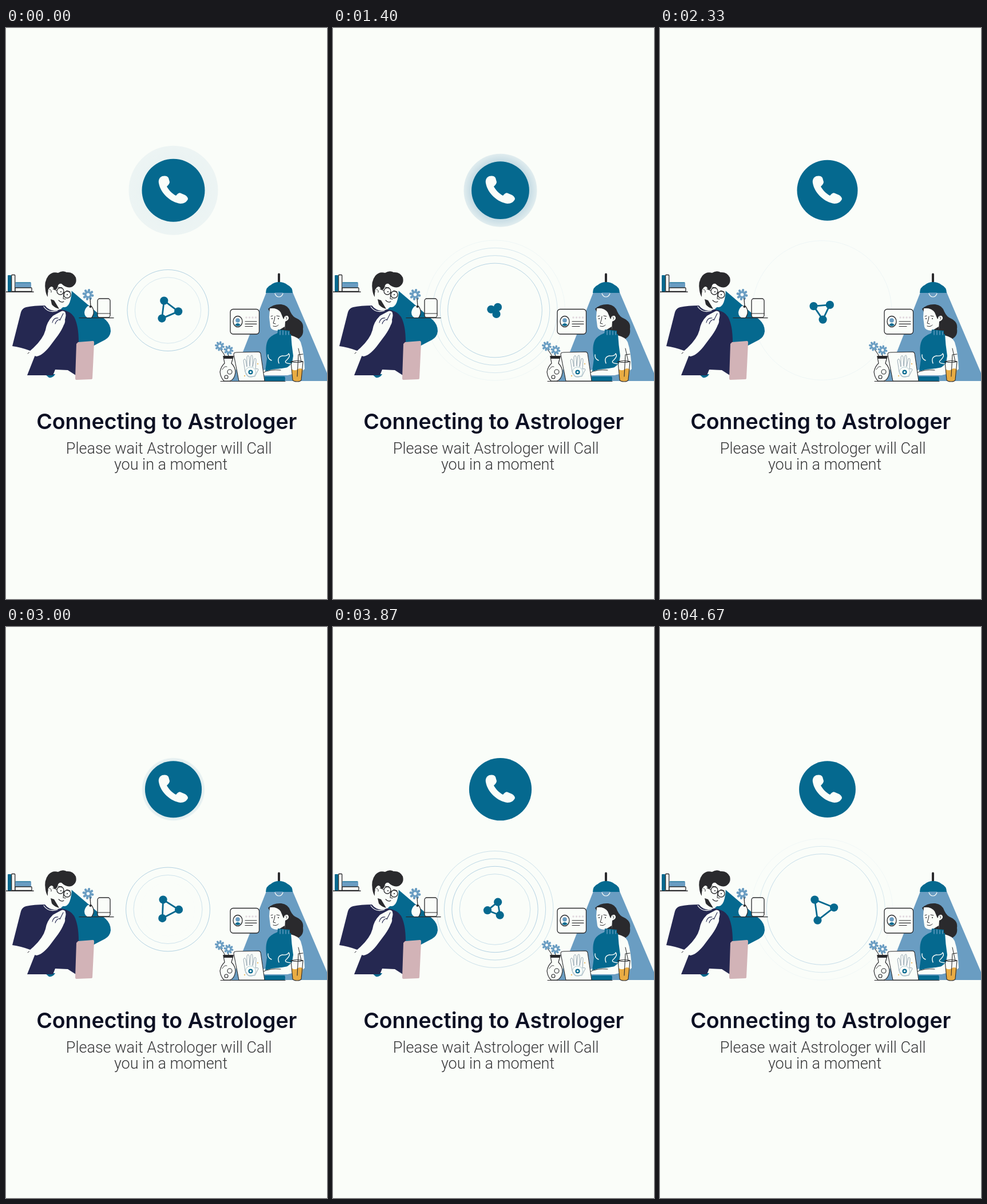
These frames come from a looping animation (561 px wide and 998 px high, 4.74 s). An HTML page with a canvas:

```html
<!DOCTYPE html>
<html lang="en">
<head>
<meta charset="utf-8">
<title>Connecting</title>
<style>
  html, body { margin: 0; width: 100%; height: 100%; overflow: hidden; background: #fafdf9; }
  canvas { display: block; }
</style>
</head>
<body>
<canvas id="stage" width="561" height="998"></canvas>
<script>
const LOOP = 4740;
const TEAL = '#05698f', NAVY = '#252851', INK = '#2a2a2d', SKY = '#6a9dc2', PAPER = '#fafdf9';
const stage = document.getElementById('stage');
let ctx = stage.getContext('2d');

const fill = (color, d) => { ctx.fillStyle = color; ctx.fill(new Path2D(d)); };
const line = (color, width, d) => {
  ctx.strokeStyle = color;
  ctx.lineWidth = width;
  ctx.stroke(new Path2D(d));
};
const shape = (color, d, width = 1.4) => { fill(color, d); line(INK, width, d); };

function disc(x, y, r, color, border) {
  ctx.beginPath();
  ctx.arc(x, y, Math.max(r, 0), 0, Math.PI * 2);
  if (color) { ctx.fillStyle = color; ctx.fill(); }
  if (border) { ctx.strokeStyle = border; ctx.stroke(); }
}

function box(x, y, w, h, r, color, border) {
  ctx.beginPath();
  ctx.roundRect(x, y, w, h, r);
  if (color) { ctx.fillStyle = color; ctx.fill(); }
  if (border) { ctx.strokeStyle = border; ctx.lineWidth = 1.3; ctx.stroke(); }
}

function flower(x, y, r) {
  for (let i = 0; i < 8; i++) {
    const a = i * Math.PI / 4 + 0.2;
    line(SKY, r * 0.42, `M${x} ${y}L${x + Math.cos(a) * r * 0.8} ${y + Math.sin(a) * r * 0.8}`);
  }
  disc(x, y, r * 0.28, PAPER);
}

// Smooth curve through [time, value] pairs
function curve(keys, t) {
  const last = keys.length - 1;
  if (t <= keys[0][0]) return keys[0][1];
  if (t >= keys[last][0]) return keys[last][1];
  const i = keys.findIndex(k => k[0] > t) - 1;
  const slope = j => {
    const a = keys[Math.max(j - 1, 0)], b = keys[Math.min(j + 1, last)];
    return (b[1] - a[1]) / (b[0] - a[0]);
  };
  const [t0, v0] = keys[i], [t1, v1] = keys[i + 1];
  const h = t1 - t0, u = (t - t0) / h, w = 1 - u;
  return v0 * (1 + 2 * u) * w * w + slope(i) * h * u * w * w
       + v1 * (3 - 2 * u) * u * u - slope(i + 1) * h * u * u * w;
}

function drawShelf() {
  box(3, 432, 6, 29, 1, TEAL);
  box(9.7, 431.5, 6, 29, 1, PAPER, INK);
  box(16, 444.5, 28, 9.5, 2, SKY);
  line(TEAL, 1, 'M17 445H43');
  box(16, 454, 29, 6.5, 1, PAPER, INK);
  line(INK, 1.6, 'M0 461.3H48');
}

function drawMan() {
  fill(TEAL, 'M105 452L113 458L174 510Q183 518 183 530Q182 540 173 545L150 557L115 570L90 520Z');
  flower(143.5, 466, 10);
  line(INK, 1.3, 'M147 473L148 487');
  fill(PAPER, 'M143 486H149Q154 491 153 500Q151 507 145 507Q137 505 137 497Q138 490 143 486Z');
  line(INK, 1.2, 'M149 486Q154 491 153 499Q152 503 150 506');
  disc(147.5, 487, 2, INK);
  box(160, 473, 22, 33, 4, PAPER, INK);
  line(INK, 1.2, 'M160 499H182');
  line(INK, 1.3, 'M128 506.7H188');

  fill(TEAL, 'M68 605H86Q82 612 75 611Z');
  fill(NAVY, 'M70 485Q48 485 35 488Q28 490 26 497L11 556Q26 558 42 564L52 569L37 607H82L86 597L108 598L122 607L127 549Q127 520 119 505Q113 495 97 492Z');
  fill('#d2b3b7', 'M126 549L152 547Q154 547 154 550L151 612Q151 614 148 614L123 615Q121 615 121 612L123 552Z');
  line(INK, 1, 'M38 569L45 563');

  fill(PAPER, 'M40 566L48 559Q65 543 69 528Q71 514 82 503L95 496Q99 493 103 496Q106 500 103 510Q104 514 101 519Q98 527 91 537L76 557Q63 573 53 574Q46 572 40 566Z');
  line(NAVY, 1.1, 'M81 515Q83 506 91 507M86 517Q88 510 95 509M100 499L94 511');
  fill(PAPER, 'M68 485Q78 498 94 492L101 487L83 470Z');
  line(PAPER, 1.3, 'M66 487Q74 499 90 494');

  fill(PAPER, 'M74 443L112 443Q117 457 113 474Q110 487 103 488Q91 488 85 483L74 470Z');
  fill(INK, 'M78 474L84 476L93 491Q83 488 80 483Z');
  fill(INK, 'M69 459Q66 443 74 433Q81 425 91 428Q99 423 106 427Q117 426 122 436Q125 448 114 453Q105 455 97 447Q93 446 91 450Q89 459 84 457Q81 449 76 454Q72 463 73 470Q70 466 69 459Z');
  disc(78, 459, 4.5, PAPER);
  line(INK, 1, 'M76 457Q80 457 79 462');
  ctx.lineWidth = 1.3;
  disc(95, 460, 6, null, INK);
  disc(107, 466, 6, null, INK);
  line(INK, 1.1, 'M82 456L89 459M100 462Q102 461 102 464M91 453L98 454M106 459L112 461');
  disc(96, 461, 1.1, INK);
  disc(107, 466, 1.1, INK);
  line(INK, 1.1, 'M101 464L100 473L104 474M92 476Q97 481 101 478');
}

function drawCard() {
  box(392, 491.5, 50.5, 43.5, 5, PAPER, INK);
  ctx.beginPath();
  ctx.ellipse(405, 513, 8, 9.5, 0, 0, Math.PI * 2);
  ctx.stroke();
  disc(405, 511, 3.8, SKY);
  fill(TEAL, 'M400 519Q405 513 410 519Q405 523 400 519Z');
  for (let x = 420; x < 440; x += 5.5) disc(x, 506, 1.7, '#e2d9df');
  line(INK, 1.2, 'M418 513H438M418 517.3H438M418 521.5H431');
}

function drawWoman() {
  fill(SKY, 'M455 462H501L561 603V617H394Z');
  line(INK, 4, 'M477 430.5V447');
  fill(TEAL, 'M454 463Q454 453 463 449Q469 444 477 444Q486 444 492 449Q501 453 501 463Z');
  fill(SKY, 'M470 462.5H484Q482 470 477 470Q472 470 470 462.5Z');
  line(PAPER, 1.2, 'M470 464Q472 470 477 470Q482 470 484 464');
  drawCard();

  fill(INK, 'M458 491Q467 482 481 483Q494 485 497 496Q501 505 509 508Q521 514 519 526Q521 539 509 544Q501 542 496 536L480 530Z');
  fill(PAPER, 'M461 490Q474 488 482 498L487 505Q492 500 494 506Q494 511 488 513L487 528L474 529Q463 528 462 522L460 506Z');
  fill(INK, 'M458 491Q472 486 480 497L485 509L489 502L487 489L471 485Z');
  disc(490, 507, 3.8, PAPER);
  line(INK, 1, 'M489 505Q492 506 490 509M470 504L469 510L467 516L471 517M463 504L466 503M473 503L478 504M467 521Q473 523 476 519');
  disc(465, 508, 1, INK);
  disc(476, 508, 1, INK);
  fill(INK, 'M477 528L487 522V529Z');

  fill(PAPER, 'M497 537Q511 540 515 549Q521 567 522 596L512 604H453L446 600Q459 593 475 594L497 577Z');
  fill(TEAL, 'M475 533L498 535Q499 554 502 573L499 592L453 600L456 578Q452 556 458 545Q462 538 475 533Z');
  fill(TEAL, 'M475 527L496 529V537H474Z');
  line(SKY, 1.4, 'M479 529V536M484 529V536M489 530V536M494 531V536');
  fill(PAPER, 'M449 602Q468 594 488 596L503 584L516 601L492 607H449Z');
  line(PAPER, 1.4, 'M477 586Q473 575 483 573Q492 574 494 569Q498 573 491 580Q483 586 499 587M458 571Q457 578 464 581');
  line(INK, 1, 'M448 603Q461 596 480 598M511 560L516 583');
  fill(TEAL, 'M452 609H487Q489 613 487 617H452Z');
}

function drawTable() {
  shape(PAPER, 'M402 567L441 566Q444 566 445 569L452 617H407L398 571Q398 567 402 567Z', 1.1);
  line('#7f93a3', 0.8, 'M418 601L415 581Q417 576 419 581L421 592L421 575Q423 570 425 575L426 591L428 573Q431 570 431 576L431 592L434 578Q437 576 437 581L436 596Q444 594 439 601L435 609H424Z');
  ctx.lineWidth = 0.8;
  disc(427.5, 601.5, 9, null, '#9dbdcb');
  disc(427.5, 601.5, 4, TEAL);
  disc(427.5, 601.5, 1.8, PAPER);
  disc(417, 608, 1.1, '#e9ac43');
  disc(440, 587, 1.1, '#e9ac43');

  line(INK, 1.1, 'M375 562Q382 570 385 579M389 568L388 579');
  flower(373.5, 556, 8.5);
  flower(389, 563, 8.5);
  shape(PAPER, 'M380 575H397L394 586Q401 593 401 602Q399 615 391 617H381Q375 611 374 601Q376 591 382 586Z', 1.2);
  fill(INK, 'M379 573H398L396 578H381Z');
  ctx.lineWidth = 1.1;
  disc(391, 601, 4, null, INK);
  disc(385, 610, 3, null, INK);
  line(INK, 0.9, 'M378 597Q382 590 386 592');

  fill('#e9ac43', 'M499 596Q504 600 509 597Q514 593 519 597L516 615Q515 618 509 618Q502 618 501 615Z');
  line(INK, 1.1, 'M498 583Q509 586 519 583L516 615Q515 618 509 618Q502 618 501 615ZM509 609L511 571L519 570');
  line(INK, 1, 'M498 583Q509 580 519 583');
  line(INK, 1, 'M375 617.5H488');
}

function drawText() {
  ctx.textAlign = 'center';
  ctx.fillStyle = '#0c1023';
  ctx.font = '600 37.5px Inter, sans-serif';
  ctx.fillText('Connecting to Astrologer', 280.8, 701);
  ctx.fillStyle = '#363638';
  ctx.font = '300 27px Roboto, sans-serif';
  ctx.fillText('Please wait Astrologer will Call', 284.7, 744);
  ctx.fillText('you in a moment', 288, 772);
}

const PULSE = 1800;
const BUTTON = [[0, 55], [250, 54.7], [530, 53], [600, 52.4], [800, 50], [1070, 49.4], [1400, 50.4], [1730, 54], [1800, 55]];
const HALO_SIZE = [[1100, 50], [1400, 64], [1730, 76], [1800, 78], [1900, 79]];
const HALO_ALPHA = [[1100, 0], [1250, 0.2], [1400, 0.25], [1730, 0.42], [1800, 0.07], [1900, 0]];
const HANDSET = 'M273 259C268 261 266 266 267 271C270 289 288 305 305 307C311 307 316 304 318 299C318 296 316 294 313 292L306 289C302 287 300 290 297 293C291 290 284 283 281 277C284 274 286 272 286 269L284 262C282 258 277 258 273 259Z';

function drawPhone(t) {
  const phase = t % PULSE, x = 292.5, y = 283.7;
  const late = phase < 150 ? phase + PULSE : phase;
  const alpha = curve(HALO_ALPHA, late);
  if (alpha > 0.005) {
    const size = curve(HALO_SIZE, late);
    const glow = ctx.createRadialGradient(x, y, 46, x, y, size);
    glow.addColorStop(0, `rgba(5,95,150,${alpha})`);
    glow.addColorStop(1, `rgba(5,95,150,${alpha * (late > 1770 ? 0.8 : 0.4)})`);
    disc(x, y, size, glow);
  }
  disc(x, y, curve(BUTTON, phase), TEAL);
  const scale = curve([[1500, 1], [1730, 0.94], [1800, 1]], phase);
  ctx.save();
  ctx.translate(x, y);
  ctx.scale(scale, scale);
  ctx.translate(-x, -y);
  fill(PAPER, HANDSET);
  ctx.restore();
}

const SPIN = 1467;
const NODE_DISTANCE = [[0, 18], [269, 21], [596, 24], [800, 20.5], [863, 16.5], [1266, 2], [1400, 7], [1467, 18]];
const NODE_ANGLE = [[0, 7], [269, -8], [596, 20], [800, -3], [863, -34], [1400, -288], [1467, -353]];
const WAVE = [[-650, 48], [0, 71], [596, 92], [800, 96], [1266, 118], [1400, 122.5], [1736, 137], [2330, 162]];
const RING_ALPHA = [[46, 0], [53, 0.09], [62, 0.22], [71, 0.32], [95, 0.24], [109, 0.16], [118, 0.06], [123, 0.05], [126, 0]];

function drawRings(t) {
  const cycle = SPIN * 2, phase = t % cycle;
  // The next wave begins once the last ring has nearly faded
  const wave = curve(WAVE, phase > 2345 ? phase - cycle : phase);
  ctx.lineWidth = 1;
  for (let i = 0; i < 4; i++) {
    const r = wave - i * 13.4;
    if (r > 46 && r < 126) disc(283, 493.5, r, null, `rgba(25,115,175,${curve(RING_ALPHA, r)})`);
  }
}

function drawNodes(t) {
  const phase = t % SPIN;
  const distance = curve(NODE_DISTANCE, phase), angle = curve(NODE_ANGLE, phase);
  const nodes = [0, 120, 240].map(turn => {
    const a = (angle + turn) * Math.PI / 180;
    return [283.3 + Math.cos(a) * distance, 493.2 + Math.sin(a) * distance];
  });
  line(TEAL, 2.8, `M${nodes.join('L')}Z`);
  for (const [x, y] of nodes) disc(x, y, 7.1, TEAL);
}

// The still scene is painted once
const scene = document.createElement('canvas');
scene.width = stage.width;
scene.height = stage.height;
const live = ctx;
ctx = scene.getContext('2d');
ctx.lineCap = ctx.lineJoin = 'round';
drawShelf();
drawMan();
drawWoman();
drawTable();
drawText();
ctx = live;
ctx.lineJoin = 'round';

function render() {
  const t = performance.now() % LOOP;
  ctx.fillStyle = PAPER;
  ctx.fillRect(0, 0, 561, 998);
  drawRings(t);
  ctx.drawImage(scene, 0, 0);
  drawPhone(t);
  drawNodes(t);
  requestAnimationFrame(render);
}
render();
</script>
</body>
</html>
```
